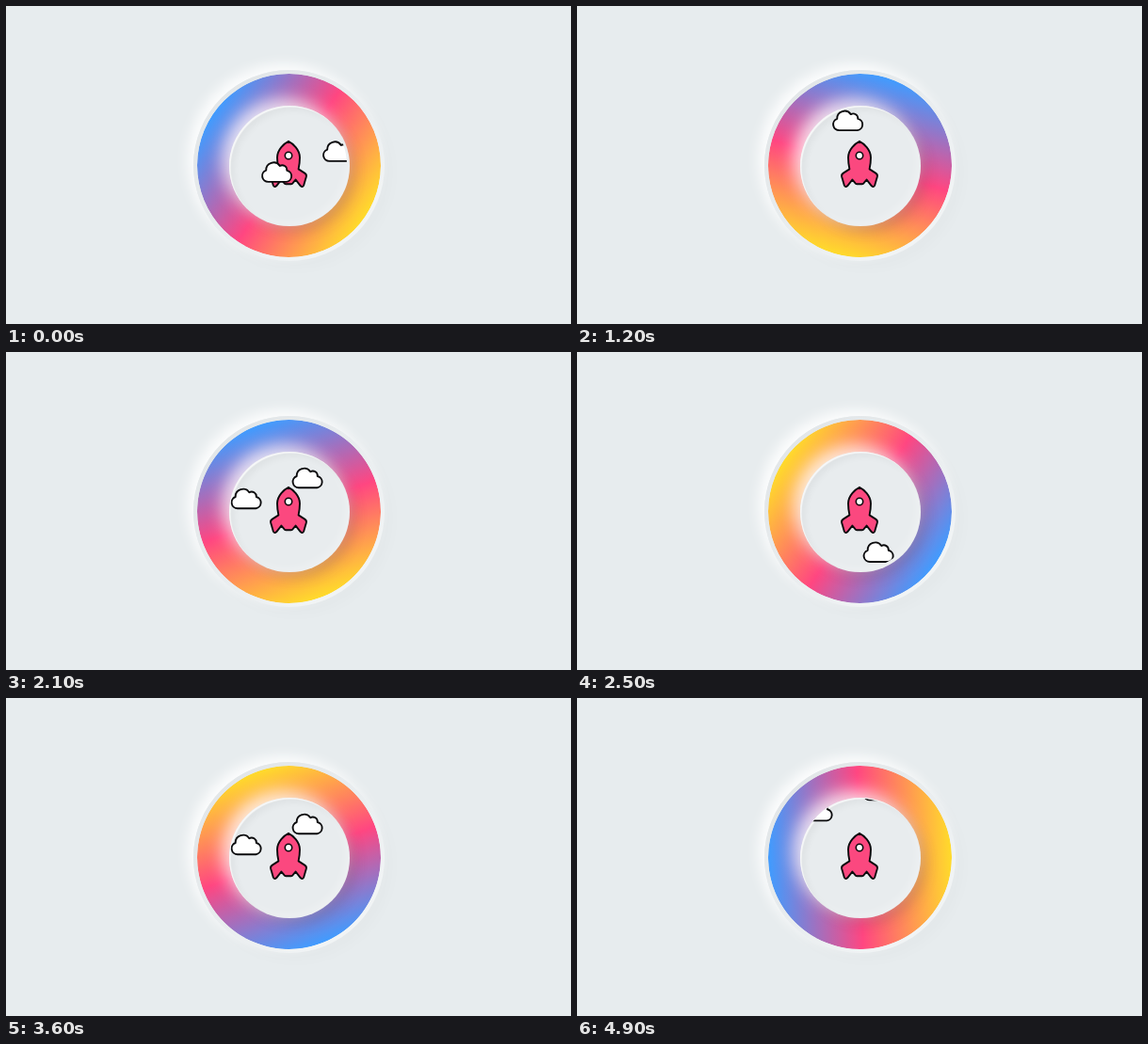
An HTML page for the animation above (5000 ms loop, 600x338 px).

```html
<!DOCTYPE html>
<html lang="en">
<head>
<meta charset="utf-8">
<title>Rocket loader</title>
<style>
  html, body { margin: 0; width: 100%; height: 100%; overflow: hidden; background: #e7ecee; }
  #stage { position: relative; width: 600px; height: 338px; overflow: hidden; }
  #stage div { position: absolute; border-radius: 50%; }
  .rim {
    left: 198.5px; top: 67.5px; width: 203px; height: 203px;
    background: linear-gradient(135deg, #e3e7e9 20%, #e9edef 50%, #f1f4f5 80%);
    box-shadow: -6px -6px 14px rgba(255, 255, 255, .9), 7px 7px 16px rgba(0, 0, 0, .02);
  }
  .ring { left: 202.5px; top: 71.5px; width: 195px; height: 195px; overflow: hidden; }
  #stage #spin { inset: 0; background: linear-gradient(#409cff, #ff4681 50%, #ffdb2b); }
  .hole {
    left: 34.5px; top: 34px; width: 128px; height: 128px;
    background: #e8ecee;
    box-shadow: -7px -7px 18px rgba(255, 255, 255, .8), 6px 6px 14px rgba(60, 60, 70, .2),
      inset 1.5px 1.5px 1px rgba(255, 255, 255, .75),
      inset 5px 5px 7px rgba(0, 0, 0, .045), inset -4px -4px 8px rgba(255, 255, 255, .25);
  }
  svg { position: absolute; left: 0; top: 0; }
</style>
</head>
<body>
<div id="stage">
  <div class="rim"></div>
  <div class="ring">
    <div id="spin"></div>
    <div class="hole"></div>
  </div>
  <svg width="600" height="338" viewBox="0 0 600 338">
    <defs>
      <clipPath id="port"><circle cx="300" cy="168.7" r="62"/></clipPath>
      <path id="cloud" d="M7.5 -1A6.3 6.3 0 0 1 5.2 -13.2A8 8 0 0 1 19.8 -18A5 5 0 0 1 27.3 -13.2A6.2 6.2 0 0 1 26.8 -1Z"/>
    </defs>
    <g stroke="#0b0b0d" stroke-width="1.9" stroke-linejoin="round" stroke-linecap="round">
      <path fill="#fb487f" d="M300 143.8C304.5 146 312 152.5 312 161C312 166 311.3 170 310.6 173.4
        L317.2 177.6Q319.4 179 318.9 181.3L316.2 190.6Q314.9 193 312.9 191.3L307.6 184.6
        L304.6 188.2Q304 189.2 302.8 189.2H297.2Q296 189.2 295.4 188.2L292.4 184.6
        L287.1 191.3Q285.1 193 283.8 190.6L281.1 181.3Q280.6 179 282.8 177.6L289.4 173.4
        C288.7 170 288 166 288 161C288 152.5 295.5 146 300 143.8Z"/>
      <circle cx="300" cy="159" r="3.7" fill="#fff" stroke-width="1.6"/>
      <g id="sky" clip-path="url(#port)" fill="#fff"></g>
    </g>
  </svg>
</div>
<script>
  const LOOP = 5000, STEP = 100, TURN = 1000, FALL = 1500;
  // left edge, height above its partner, delay in ms
  const clouds = [
    { x: 238.5, lift: 0, delay: 0 },
    { x: 303.5, lift: 22, delay: 0 },
    { x: 271, lift: 0, delay: 790 },
    { x: 336, lift: 22, delay: 790 }
  ];
  const spin = document.getElementById('spin');
  const sky = document.getElementById('sky');

  for (const c of clouds) {
    c.node = document.createElementNS('http://www.w3.org/2000/svg', 'use');
    c.node.setAttribute('href', '#cloud');
    sky.append(c.node);
  }

  function fallY(ms) {
    const u = ms - 700;
    return 186 + 0.191 * u + 3e-5 * u * u;
  }

  function draw(t) {
    spin.style.transform = `rotate(${304 + 360 * t / TURN}deg)`;
    for (const c of clouds) {
      const phase = (t - c.delay + FALL) % FALL;
      c.node.setAttribute('transform', `translate(${c.x} ${fallY(phase) - c.lift})`);
    }
  }

  const start = performance.now();
  function tick() {
    const t = (performance.now() - start) % LOOP;
    draw(Math.floor(t / STEP) * STEP);
    requestAnimationFrame(tick);
  }
  draw(0);
  requestAnimationFrame(tick);
</script>
</body>
</html>
```
